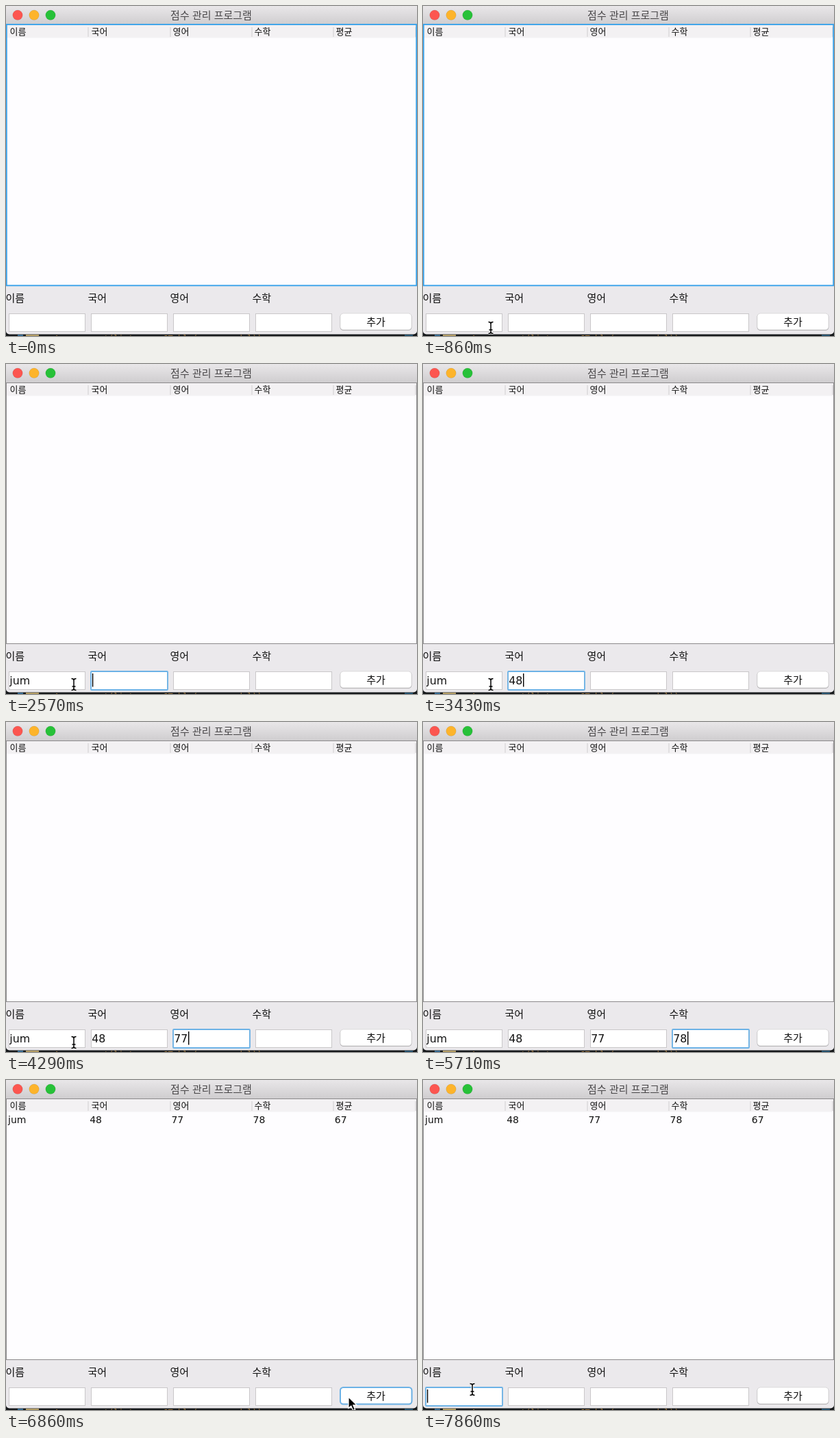
Write an HTML page that moves like this. It is 600 by 482 pixels and loops after 8 s.

```html
<!DOCTYPE html>
<html lang="ko">
<head>
<meta charset="utf-8">
<style>
  html, body { margin: 0; width: 100%; height: 100%; overflow: hidden; background: #16191b; }
  svg { display: block; }
  text { font-family: "Noto Sans CJK KR", "Noto Sans CJK", sans-serif; font-size: 15px; fill: #111; white-space: pre; }
  .head { font-size: 13px; }
  .cell { font: 14px "DejaVu Sans", sans-serif; }
  .entry { font: 15.8px "DejaVu Sans", sans-serif; }
  .code { font: 12px "DejaVu Sans Mono", monospace; fill: #94703c; }
</style>
</head>
<body>
<svg id="stage" width="600" height="482" viewBox="0 0 600 482">
  <defs>
    <linearGradient id="bar" x2="0" y2="1">
      <stop stop-color="#e9e7e9"/><stop offset="1" stop-color="#cfcdcf"/>
    </linearGradient>
  </defs>
</svg>
<script>
const stage = document.getElementById('stage');
const STEPS = 56, RATE = 7;
const NAME = 'jum';
const BLUE = '#3ba3ea';

function add(tag, attrs, label) {
  const el = document.createElementNS('http://www.w3.org/2000/svg', tag);
  for (const k in attrs) el.setAttribute(k, attrs[k]);
  if (label) el.textContent = label;
  return stage.appendChild(el);
}
const rect = (x, y, width, height, fill, more) => add('rect', { x, y, width, height, fill, ...more });
const text = (x, y, label, cls = '', more) => add('text', { x, y, class: cls, ...more }, label);
const show = (el, on) => el.setAttribute('visibility', on ? 'visible' : 'hidden');

// Editor behind the window
rect(0, 470, 600, 12, '#16191b');
text(56, 490, '; Arrays.sort(list, new JTable(rows, model));', 'code');
rect(17, 480, 8, 2, '#35698f');
rect(29, 480, 19, 2, '#b09a62');
rect(582, 480, 12, 2, '#24506c');

// Window
rect(0, 400, 600, 79.5, '#ebe9ec', { rx: 5 });
rect(0, 20, 600, 450, '#ebe9ec');
rect(0, 0, 600, 27, 'url(#bar)');
['#fc5650', '#fdb42b', '#27c138'].forEach((fill, i) =>
  add('circle', { cx: 17 + 24 * i, cy: 13.3, r: 7.2, fill, stroke: '#0002', 'stroke-width': .6 }));
text(299.5, 18.7, '점수 관리 프로그램', '', { 'text-anchor': 'middle', style: 'fill:#4a484a' });

// Table
rect(0, 27, 600, 381, '#fefdff');
rect(1, 28, 598, 18.5, '#f3f1f3');
['이름', '국어', '영어', '수학', '평균'].forEach((label, i) => {
  text(5.5 + 119 * i, 41.8, label, 'head');
  rect(Math.round(119.3 * (i + 1)) + .5, 31, 1, 14, '#d0ced0');
  if (i < 4) text(120 * i - .5, 432.4, label);
});
const grey = rect(.5, 27.5, 599, 381, 'none', { stroke: '#8b898b' });
const glow = rect(.8, 27, 598.4, 381.3, 'none', { stroke: BLUE, 'stroke-width': 1.9 });
const row = [NAME, '48', '77', '78', '67'].map((v, i) => text(3 + 119.2 * i, 62.5, v, 'cell'));

// Form
const fields = [0, 1, 2, 3].map(i => {
  const x = 4 + 120 * i;
  rect(x + .5, 449.5, 111, 26, '#fff', { stroke: '#c9c7c9' });
  const ring = rect(x, 449, 112, 27, 'none', { stroke: '#6cb2e6', 'stroke-width': 1.8, rx: 1 });
  return { x, ring, label: text(x + 1.3, 467.6, '', 'entry') };
});
rect(487.7, 449.3, 104.6, 24.6, '#aaa8aa', { rx: 4.5 });
rect(488, 449, 104, 24, '#fff', { rx: 4.5, stroke: '#cfcdcf', 'stroke-width': .6 });
const buttonRing = rect(488, 449, 104.5, 24.5, 'none', { rx: 4.5, stroke: '#6cb2e6', 'stroke-width': 2 });
text(540, 466.6, '추가', '', { 'text-anchor': 'middle' });
const caret = rect(0, 452, 1.4, 19.5, '#000');

// Pointers, hot spot at the origin
const arrow = add('path', {
  d: 'M0 0V16.5L3.8 13L6.6 19.6L9.6 18.3L6.8 11.9H12Z',
  fill: '#000', stroke: '#fff', 'stroke-width': 1.2
});
const beamPath = 'M-3.5 -8.5Q0 -8.5 0 -6Q0 -8.5 3.5 -8.5M0 -6V6M-3.5 8.5Q0 8.5 0 6Q0 8.5 3.5 8.5M-2.5 3H2.5';
const beam = add('g', { fill: 'none' });
[['#fff', 3.2], ['#000', 1.5]].forEach(([stroke, w]) =>
  beam.appendChild(add('path', { d: beamPath, stroke, 'stroke-width': w })));

// Steps at which each character of a field is typed
const typed = [
  [NAME, 11, 14, 16],
  ['48', 21, 23],
  ['77', 28, 29],
  ['78', 34, 37]
];
// [step, focused part]: -1 table, 0-3 fields, 4 button
const focus = [[0, -1], [8, 0], [18, 1], [26, 2], [32, 3], [47, 4], [54, 0]];
const SUBMIT = 48;
const path = [
  [0, 150, 510], [2, 140, 494], [6, 99, 470], [8, 99, 468], [39, 99, 468],
  [40, 120, 505], [42, 480, 510], [45, 510, 474], [46, 500, 463],
  [49, 500, 463], [54, 72, 452], [56, 72, 452]
];

function pointer(n) {
  const i = path.findIndex(p => p[0] > n);
  const [a, x0, y0] = path[i - 1], [b, x1, y1] = path[i];
  const k = (n - a) / (b - a);
  return [x0 + (x1 - x0) * k, y0 + (y1 - y0) * k];
}

function draw(n) {
  const [since, part] = focus.filter(f => f[0] <= n).pop();
  show(glow, part < 0);
  show(grey, part >= 0);
  show(buttonRing, part === 4);
  row.forEach(el => show(el, n >= SUBMIT));

  let last = since;
  fields.forEach((f, i) => {
    const [word, ...at] = typed[i];
    const keys = at.filter(s => s <= n);
    f.label.textContent = n < SUBMIT ? word.slice(0, keys.length) : '';
    show(f.ring, part === i);
    if (part === i) last = Math.max(last, ...keys.filter(s => s >= since));
  });

  const active = fields[part];
  show(caret, active && (n - last) % 7 < 3.5);
  if (active) {
    const width = active.label.textContent ? active.label.getComputedTextLength() : 0;
    caret.setAttribute('x', active.x + 1.9 + width);
  }

  const [x, y] = pointer(n);
  const onField = x < 478 && y > 447 && y < 480;
  show(arrow, !onField);
  show(beam, onField);
  (onField ? beam : arrow).setAttribute('transform', `translate(${x} ${y})`);
}

const start = performance.now();
function tick(now) {
  const t = Math.max(0, now - start) / 1000;
  draw(Math.floor(t * RATE + .035) % STEPS);
  requestAnimationFrame(tick);
}
draw(0);
requestAnimationFrame(tick);
</script>
</body>
</html>
```
